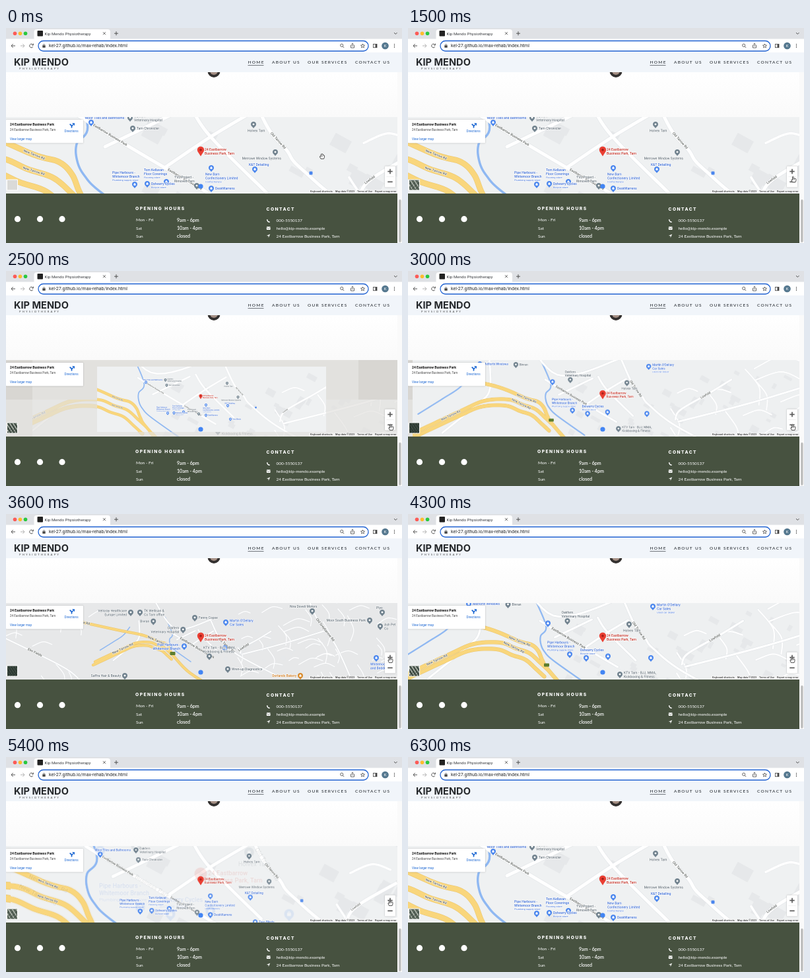
Write an HTML page with a canvas that moves like this. It is 600 by 326 pixels and loops after 6400 ms.

```html
<!DOCTYPE html>
<html lang="en">
<head>
<meta charset="utf-8">
<title>Kip Mendo Physiotherapy</title>
<style>
html, body { margin: 0; width: 100%; height: 100%; overflow: hidden; background: #fff; }
canvas { display: block; width: 600px; height: 326px; }
</style>
</head>
<body>
<canvas id="stage"></canvas>
<script>
const LOOP = 6400, STEP = 100, CX = 295, CY = 194, MAP_TOP = 135, MAP_END = 251, PAGE_W = 593;
const SHOP = '#3f6fd6', CIVIC = '#68747d', FOOD = '#d07a1c';
const PIN = { [SHOP]: '#4a86ee', [CIVIC]: '#72838f', [FOOD]: '#d98a2b' };
const stage = document.getElementById('stage');
const dpr = Math.max(1, window.devicePixelRatio || 1);
stage.width = 600 * dpr;
stage.height = 326 * dpr;
const screen2d = stage.getContext('2d');
let g = screen2d;

const clamp = v => Math.min(1, Math.max(0, v));
const ease = v => v < .5 ? 2 * v * v : 1 - 2 * (1 - v) ** 2;
const mix = (a, b, p) => a + (b - a) * p;
const seeded = seed => () => (seed = seed * 16807 % 2147483647) / 2147483647;

function rect(x, y, w, h, color, r = 0) {
  g.fillStyle = color;
  g.beginPath();
  g.roundRect(x, y, w, h, r);
  g.fill();
}
function panel(x, y, w, h) {
  g.shadowColor = 'rgba(0,0,0,.3)';
  g.shadowBlur = 2 * dpr;
  rect(x, y, w, h, '#fff', 1);
  g.shadowBlur = 0;
  g.shadowColor = 'transparent';
}
function disc(x, y, r, color) {
  g.fillStyle = color;
  g.beginPath();
  g.arc(x, y, r, 0, 7);
  g.fill();
}
function arc(x, y, r, from, to, color, width) {
  g.strokeStyle = color;
  g.lineWidth = width;
  g.beginPath();
  g.arc(x, y, r, from, to);
  g.stroke();
}
function path(pts) {
  g.beginPath();
  for (let i = 0; i < pts.length; i += 2) g.lineTo(pts[i], pts[i + 1]);
}
function line(pts, color, width = 1) {
  g.strokeStyle = color;
  g.lineWidth = width;
  path(pts);
  g.stroke();
}
function shape(pts, color) {
  g.fillStyle = color;
  path(pts);
  g.fill();
}
function text(s, x, y, size, color, { weight = 400, family = 'Roboto', gap = 0, halo = false, angle = 0, align = 'left' } = {}) {
  g.save();
  g.translate(x, y);
  g.rotate(angle);
  g.font = `${weight} ${size}px ${family}, sans-serif`;
  g.letterSpacing = gap + 'px';
  g.textAlign = align;
  if (halo) {
    g.strokeStyle = 'rgba(255,255,255,.85)';
    g.lineWidth = 1.3;
    g.strokeText(s, 0, 0);
  }
  g.fillStyle = color;
  g.fillText(s, 0, 0);
  g.restore();
}

// Map positions are offsets from the red marker at the closest zoom; each level halves them.
const way = (points, name) => ({ name, pts: curve(points.split(' ').map(p => p.split(',').map(Number))) });
function curve(keys) {
  const out = [], at = i => keys[Math.min(keys.length - 1, Math.max(0, i))];
  for (let i = 0; i < keys.length - 1; i++)
    for (let u = 0; u < 1; u += .1)
      out.push([0, 1].map(d => {
        const [a, b, c, e] = [at(i - 1)[d], at(i)[d], at(i + 1)[d], at(i + 2)[d]];
        return b + u / 2 * (c - a + u * (2 * a - 5 * b + 4 * c - e + u * (3 * (b - c) + e - a)));
      }));
  return out.concat([at(keys.length - 1)]);
}
const shifted = ({ pts }, dx, dy) => ({ pts: pts.map(([x, y]) => [x + dx, y + dy]) });

const mainRoad = way('-940,-168 -520,-76 -354,-42 -253,-2 -215,9 -195,28 -183,56 -165,85 -80,176 20,244', 'New Tarrow Rd');
const slipRoad = way('-640,120 -470,40 -390,6 -310,2 -262,20 -222,34 -190,62 -165,85', 'New Tarrow Rd');
const trunks = [mainRoad, slipRoad, shifted(slipRoad, -12, 20)];
const rivers = [
  way('-215,-150 -172,-50 -188,-18 -187,8 -176,30 -150,56 -60,120'),
  way('-610,50 -530,0 -470,-40 -430,-90')
];
const lanes = [
  way('60,-134 100,-46 130,-9 152,19 245,91 465,206', 'Old Tarrow Rd'),
  way('-190,-64 -105,-12 45,76', 'Eastbarrow Business Park'),
  way('640,-296 708,-136 820,24 932,272', 'Old Greybarrow Rd'),
  way('425,-64 350,-18 257,36 240,68', 'Lowfold'),
  way('-145,-14 -95,-38 -33,-68'),
  way('-55,18 15,-29 77,-66'),
  way('-15,-74 15,-29 100,56'),
  way('-530,112 -420,22 -374,-28 -374,-128'),
  way('-1180,-20 -820,160 -700,270', 'Elm Fields'),
  way('250,75 500,10 760,-70'),
  way('-280,-250 -150,-80 60,-134')
];
const rand = seeded(77);
const closes = Array.from({ length: 60 }, () => {
  const x = rand() < .3 ? mix(-1250, -650, rand()) : mix(220, 1250, rand()), y = mix(-250, 240, rand());
  const a = (rand() < .5 ? .9 : -.6) + rand() * .3, r = 35 + rand() * 60, b = a + .3;
  return { pts: curve([[x, y], [x + r * Math.cos(a), y + r * Math.sin(a)], [x + 1.7 * r * Math.cos(b), y + 1.7 * r * Math.sin(b)]]) };
});
const blocks = Array.from({ length: 40 }, () => ({
  x: mix(-120, 620, rand()), y: mix(-110, 110, rand()), w: 10 + rand() * 24, h: 8 + rand() * 14
}));

// Label side for each zoom level: R right, L left, A/a above, B below, E below and right-aligned, '.' pin only, '-' hidden.
const places = [
  [-107, -52, CIVIC, 'RAL', 'Oakfern|Veterinary Hospital'],
  [-103, -36, CIVIC, 'R--', 'Tarn Chronicler'],
  [-166, -45, SHOP, 'A.-', 'Moor Tiles and Bathrooms'],
  [80, -42, CIVIC, 'BB-', 'Holvex Tarn'],
  [113, 0, CIVIC, 'E--', 'Merrowe Window Systems'],
  [82, 26, SHOP, 'A--', 'K&T Detailing'],
  [-100, 49, SHOP, 'aaL', 'Pipe Harbours -|Whitemoor Branch', 'Plumbing supply store'],
  [-52, 45, SHOP, 'a--', 'Tom Kellavan|Floor Coverings', 'Flooring store'],
  [-81, 48, SHOP, 'R--', 'Delwarry Cycles', 'Bicycle store'],
  [-50, 60, SHOP, '-A-', 'Delwarry Cycles', 'Bicycle store'],
  [-6, 51, CIVIC, 'a--', 'TVL Project -|Rimovelt Tarn'],
  [16, 24, SHOP, 'B--', 'New Barn|Confectionery Limited', 'Confectionery'],
  [16, 55, SHOP, 'R.-', 'DeskWarrens'],
  [146, 60, SHOP, '-..', ''],
  [90, 67, SHOP, 'R--', 'Tavo Blinds'],
  [-406, -104, SHOP, '-R-', 'Melforth Windows'],
  [-287, -102, CIVIC, '-RL', 'Bivran'],
  [152, -96, SHOP, '-RR', "Martin O'Dellary|Car Sales", 'Used car dealer'],
  [52, 110, CIVIC, '-RA', 'KTV Tarn - BJJ, MMA,|Kickboxing & Fitness'],
  [-424, -156, CIVIC, '--L', 'Velloray Healthcare|Europe Limited'],
  [-368, -156, CIVIC, '--R', 'TK Wellisan &|Co Tarn office'],
  [-36, -124, CIVIC, '--R', 'Fenny Copse'],
  [1024, -108, CIVIC, '--L', 'Moor South Business Park'],
  [676, -164, CIVIC, '--a', 'Nira Doveli Motors'],
  [1100, -156, CIVIC, '--A', 'Plyo'],
  [1088, -72, CIVIC, '--R', 'Ash Pet|Co'],
  [164, 188, CIVIC, '--R', 'Wren-up Diagnostics'],
  [604, 228, FOOD, '--L', 'Dorlands Bakery'],
  [-460, 228, CIVIC, '--L', 'Saffra Hair & Beauty'],
  [1064, 120, SHOP, '--B', 'Whitemoor|and Bedding']
];

function strokeWays(list, k, color, width) {
  g.strokeStyle = color;
  g.lineWidth = width;
  for (const { pts } of list) {
    g.beginPath();
    for (const [x, y] of pts) g.lineTo(CX + x / k, CY + y / k);
    g.stroke();
  }
}
// Repeats a road's name at even distances along its visible part.
function nameRoad({ name, pts }, k) {
  let next = 45, walked = 0;
  for (let i = 1; i < pts.length; i++) {
    const [dx, dy] = [0, 1].map(d => (pts[i][d] - pts[i - 1][d]) / k);
    const x = CX + pts[i][0] / k, y = CY + pts[i][1] / k;
    if (x < 0 || x > PAGE_W || y < MAP_TOP || y > MAP_END) continue;
    walked += Math.hypot(dx, dy);
    if (walked < next) continue;
    next += 130;
    let angle = Math.atan2(dy, dx);
    if (Math.abs(angle) > Math.PI / 2) angle += Math.PI;
    text(name, x, y + 1.5, 5.1, '#5d625f', { weight: 500, halo: true, angle, align: 'center' });
  }
}
function drop(x, tip, r, height, color) {
  const y = tip - height;
  shape([x - r * .92, y + r * .4, x, tip, x + r * .92, y + r * .4], color);
  disc(x, y, r, color);
}
function place([dx, dy, color, sides, name, sub], level) {
  const side = sides[level], x = CX + dx / 2 ** level, tip = CY + dy / 2 ** level, y = tip - 6;
  if (side === '-') return;
  drop(x, tip, 4, 6, PIN[color]);
  if (color === CIVIC) disc(x, y, 1.4, '#fff');
  else {
    rect(x - 1.6, y - .8, 3.2, 2.6, '#fff', .4);
    arc(x, y - .8, .9, Math.PI, 0, '#fff', .6);
  }
  if (side === '.') return;
  const lines = name.split('|'), small = level < 2 && sub;
  const left = { R: 6, L: -6, A: -9, a: -34, B: -9, E: 9 }[side];
  const top = 'Aa'.includes(side) ? 1 - 6 * lines.length - (small ? 5 : 0) : 'BE'.includes(side) ? 11.5 : lines.length > 1 ? -.5 : 2;
  const align = 'LE'.includes(side) ? 'right' : 'left';
  lines.forEach((s, i) => text(s, x + left, y + top + 6 * i, 5, color, { weight: 500, halo: true, align }));
  if (small) text(sub, x + left, y + top + 6 * lines.length - 1, 4, color, { halo: true, align });
}
function marker() {
  drop(CX, CY + .5, 5.2, 9.7, '#ea3f33');
  disc(CX, CY - 9.2, 1.8, '#a51f1a');
  ['24 Eastbarrow', 'Business Park, Tarn'].forEach((s, i) =>
    text(s, 301, 186 + 6 * i, 5.1, '#c5352b', { weight: 500, halo: true }));
}

const AREA = { x: CX - 314, y: CY - 98, w: 694, h: 198, res: 2 };
function paintLevel(level) {
  const c = document.createElement('canvas'), k = 2 ** level, res = AREA.res * dpr;
  c.width = AREA.w * res;
  c.height = AREA.h * res;
  g = c.getContext('2d');
  g.scale(res, res);
  g.translate(-AREA.x, -AREA.y);
  g.lineCap = g.lineJoin = 'round';
  rect(AREA.x, AREA.y, AREA.w, AREA.h, ['#eff1f2', '#eef0f1', '#e7e8e9'][level]);
  for (const { x, y, w, h } of blocks) {
    g.save();
    g.translate(CX + x / k, CY + y / k);
    g.rotate(.5);
    rect(0, 0, w / k, h / k, '#e6e8ea');
    g.restore();
  }
  const lane = 5.2 / k ** .72, trunk = 8 / k ** .6;
  strokeWays(rivers, k, '#8fb8f2', 3.4 / k ** .6);
  strokeWays(closes, k, '#dfe2e6', lane * .7 + .6);
  strokeWays(closes, k, '#fff', lane * .7);
  strokeWays(lanes, k, '#dbdfe3', lane + .9);
  strokeWays(lanes, k, '#fff', lane);
  strokeWays(trunks, k, '#e6bd5c', trunk + .8);
  strokeWays(trunks, k, '#f9d67c', trunk);
  [...trunks, ...lanes].filter(w => w.name).forEach(w => nameRoad(w, k));
  if (level) rect(CX - 170 / k - 4, CY + 70 / k - 2.5, 8, 5, '#5c7d2e', 1);
  else rect(459.5, 217.5, 5, 5, PIN[SHOP], 1);
  places.forEach(p => place(p, level));
  marker();
  g = screen2d;
  return c;
}
const levels = [0, 1, 2].map(paintLevel);

function drawLevel(level, scale, alpha = 1) {
  g.globalAlpha = alpha;
  g.drawImage(levels[level], CX + (AREA.x - CX) * scale, CY + (AREA.y - CY) * scale, AREA.w * scale, AREA.h * scale);
  g.globalAlpha = 1;
}
function clipTo(x, y, w, h) {
  g.save();
  g.beginPath();
  g.rect(x, y, w, h);
  g.clip();
}

const zooms = [
  { start: 2100, from: 0, to: 1 }, { start: 2900, from: 1, to: 2 },
  { start: 3900, from: 2, to: 1 }, { start: 5100, from: 1, to: 0 }
];
function map(t) {
  const { start, from, to } = zooms.filter(z => t >= z.start).pop() || { start: -LOOP, from: 1, to: 0 };
  const p = ease(clamp((t - start) / 400));
  clipTo(0, MAP_TOP, PAGE_W, MAP_END - MAP_TOP);
  rect(0, MAP_TOP, PAGE_W, MAP_END - MAP_TOP, '#e2e1de');
  if (to > from) {
    for (const x of [0, 534]) rect(x, MAP_TOP, x ? 60 : 40, 60, '#d8d6d2');
    clipTo(40, 195, PAGE_W, 60);
    drawLevel(to, 2 ** (1 - p), .3 * p);
    g.restore();
    drawLevel(from, 2 ** -p);
    drawLevel(to, 2 ** (1 - p), clamp((t - start - 400) / 300));
  } else {
    if (p < 1) drawLevel(from, 2 ** p);
    drawLevel(to, 2 ** (p - 1), p);
  }
  disc(295, 240, 3.6, '#4285f4');
  thumbnail(to, t >= 300);
  infoCard();
  controls();
  g.restore();
}

function thumbnail(level, loaded) {
  rect(1, 229.5, 17, 17, '#fff', 1);
  rect(2, 230.5, 15, 15, loaded ? ['#59665b', '#465249', '#303c35'][level] : '#dadad8');
  if (!loaded) return;
  clipTo(2, 230.5, 15, 15);
  for (let i = -15; i < 32; i += 6 - level) {
    line([i, 230, i + 11, 247], level === 2 ? '#5a6a5d' : '#b4bab1', level === 2 ? .6 : 1.5);
    line([i, 247, i + 15, 233], '#27322c', .7);
  }
  g.restore();
}
function infoCard() {
  const link = '#1a66d2';
  panel(0, 139, 117, 35.5);
  text('24 Eastbarrow Business Park', 6, 148.3, 5.1, '#111', { weight: 700 });
  text('24 Eastbarrow Business Park, Tarn', 6, 156.3, 4.5, '#444');
  text('View larger map', 6, 169.5, 4.6, link);
  text('Directions', 88.5, 157.7, 4.7, link);
  line([99.5, 151.5, 99.5, 148.3, 96.7, 145.6], link, 1.7);
  line([99.5, 148.8, 101.8, 146.5], link, 1.5);
  shape([100, 144.2, 104, 144.2, 104, 148.2], link);
}
function controls() {
  rect(459, 245.5, 135, 6, 'rgba(245,245,245,.75)');
  [['Keyboard shortcuts', 461], ['Map data ©2023', 499], ['Terms of Use', 532], ['Report a map error', 559]]
    .forEach(([s, x]) => text(s, x, 249.3, 3.9, '#111'));
  panel(574, 209.5, 16, 32);
  line([576.5, 225.5, 587.5, 225.5], '#e6e6e6', .6);
  for (const y of [217.5, 233.3]) line([578.3, y, 585.7, y], '#555', 1.6);
  line([582, 213.8, 582, 221.2], '#555', 1.6);
}

function browser() {
  const ink = '#444';
  rect(0, 0, 600, 17, '#dfe1e5');
  ['#fc5b57', '#fdbc2e', '#29c840'].forEach((c, i) => disc(13.5 + 8 * i, 8.2, 2.8, c));
  rect(42.5, 2, 115.5, 18, '#fff', 4);
  rect(0, 16.5, 600, 20.5, '#fff');
  rect(47.5, 4, 8.5, 8.5, '#222', 1);
  text('Kip Mendo Physiotherapy', 58.5, 10.8, 6.2, '#3a3d41');
  for (const d of [-2, 2]) line([149 - d, 6.2, 149 + d, 10.2], ink, .8);
  line([164, 8.2, 170, 8.2], ink, .9);
  line([167, 5.2, 167, 11.2], ink, .9);
  line([588, 7, 590.3, 9.3, 592.6, 7], ink, .9);
  for (const [x, d, c] of [[11, 1, ink], [25, -1, '#aaa']]) {
    line([x - 3, 27, x + 3, 27], c, .9);
    line([x - d * .4, 24.2, x - d * 3, 27, x - d * .4, 29.8], c, .9);
  }
  arc(38.5, 27, 2.8, .5, 5.6, ink, .9);
  line([41.4, 23.6, 41.4, 26, 39, 26], ink, .9);

  g.beginPath();
  g.roundRect(49, 19.5, 500, 15.5, 7.7);
  g.strokeStyle = '#1c5fd0';
  g.lineWidth = 1.3;
  g.stroke();
  rect(55.3, 26.2, 4.4, 3.6, ink, .5);
  arc(57.5, 26, 1.4, Math.PI, 0, ink, .7);
  text('kel-27.github.io/max-rehab/index.html', 65, 29.4, 7, '#25282b');
  arc(508.7, 26.3, 2.1, 0, 7, ink, .8);
  line([510.3, 28, 512.2, 30], ink, .8);
  line([523.5, 26, 522.5, 26, 522.5, 30, 527.5, 30, 527.5, 26, 526.5, 26], ink, .8);
  line([525, 28, 525, 23.3], ink, .8);
  line([523.6, 24.7, 525, 23.3, 526.4, 24.7], ink, .8);
  const star = Array.from({ length: 11 }, (_, i) => {
    const a = (i / 5 - .5) * Math.PI, r = i % 2 ? 1.4 : 3.2;
    return [540.5 + r * Math.cos(a), 27.2 + r * Math.sin(a)];
  });
  line(star.flat(), ink, .8);
  g.strokeRect(556.5, 24.5, 5.5, 5.2);
  rect(559.6, 24.5, 2.4, 5.2, ink);
  disc(574.5, 27, 5.3, '#55788f');
  text('K', 574.5, 29.1, 5.8, '#fff', { align: 'center' });
  for (const d of [-2.3, 0, 2.3]) disc(588.5, 27 + d, .7, ink);
}

function header() {
  const fade = g.createLinearGradient(0, 67, 0, MAP_TOP);
  fade.addColorStop(0, '#fff');
  fade.addColorStop(1, '#fafafa');
  rect(0, 67, PAGE_W, 68, fade);
  disc(315, 65.3, 9.6, '#33302f');
  disc(315, 65, 6, '#a58f84');
  rect(0, 37, 600, 30, '#f1f5fa');
  text('KIP MENDO', 12, 56.5, 14.6, '#25282b', { weight: 700, family: 'Inter' });
  text('PHYSIOTHERAPY', 20, 62.8, 4.2, '#444', { family: 'Lato', gap: 2.2 });
  [['HOME', 366.5], ['ABOUT US', 403], ['OUR SERVICES', 457], ['CONTACT US', 529]]
    .forEach(([s, x]) => text(s, x, 54.2, 6.5, '#2b3036', { weight: 500, family: 'Lato', gap: 1.3 }));
  line([366.5, 56.6, 390.5, 56.6], '#34393f', .7);
}

function footer() {
  const white = '#fff', green = '#475240', lato = { family: 'Lato' };
  const title = { weight: 800, family: 'Inter', gap: 1.5 };
  rect(0, MAP_END, PAGE_W, 326 - MAP_END, green);
  for (const x of [17.5, 51.5, 85]) disc(x, 289.7, 4.6, white);
  text('OPENING HOURS', 196, 276, 6.7, white, title);
  text('CONTACT', 394.5, 277.4, 6.6, white, title);
  [['Mon - Fri', '9am - 6pm'], ['Sat', '10am - 4pm'], ['Sun', 'closed']].forEach(([day, hours], i) => {
    text(day, 197, 293.4 + 12.2 * i, 6.5, white, lato);
    text(hours, 259, 293.8 + 12.2 * i, 7.1, white, { ...lato, weight: 600 });
  });
  ['000-5550137', 'hello@kip-mendo.example', '24 Eastbarrow Business Park, Tarn']
    .forEach((s, i) => text(s, 409.5, 294.3 + 11.6 * i, 6.4, white, lato));
  arc(399.7, 290.3, 4, Math.PI / 2, Math.PI, white, 1.6);
  rect(394.8, 301.3, 5.8, 4.6, white, .7);
  line([394.9, 302.4, 397.7, 304.3, 400.5, 302.4], green, .6);
  shape([400.2, 312.4, 394.8, 315, 397.6, 315.2, 397.8, 318], white);
  rect(PAGE_W, 67, 7, 259, '#fafafa');
  rect(595, 260, 3.8, 65, '#c1c1c1', 1.9);
}

function hand(x, y, pointing) {
  const reach = pointing ? -4.8 : -3.2;
  g.save();
  g.translate(x, y);
  g.beginPath();
  g.moveTo(-2, 4.3);
  g.lineTo(-3.7, 1.2);
  g.quadraticCurveTo(-3.6, -.2, -2, 1);
  g.lineTo(-2, reach + 1);
  g.quadraticCurveTo(-1.2, reach - .5, -.4, reach + 1);
  g.lineTo(-.4, pointing ? -1.2 : -3);
  g.quadraticCurveTo(1.1, pointing ? -2 : -3.9, 1.9, -1.1);
  g.quadraticCurveTo(3.3, -1.6, 3.5, .1);
  g.quadraticCurveTo(3.7, 2.7, 2.5, 4.3);
  g.closePath();
  g.fillStyle = '#fff';
  g.fill();
  g.strokeStyle = '#222';
  g.lineWidth = .8;
  g.stroke();
  for (const d of [-.5, .9]) line([d, -1, d, .9], '#222', .5);
  g.restore();
}
const moves = [
  { start: 900, end: 1500, x: 584.5, y: 229.5 },
  { start: 1500, end: 2000, x: 583.5, y: 237 },
  { start: 3200, end: 3500, x: 582.5, y: 221 }
];
function cursor(t) {
  if (t >= 5900) return;
  let x = 479, y = 194;
  for (const m of moves) {
    const p = ease(clamp((t - m.start) / (m.end - m.start)));
    x = mix(x, m.x, p);
    y = mix(y, m.y, p);
  }
  hand(x, y, t >= 1500);
}

function frame(now) {
  const t = Math.floor(now % LOOP / STEP) * STEP;
  g.setTransform(dpr, 0, 0, dpr, 0, 0);
  g.imageSmoothingQuality = 'high';
  rect(0, 0, 600, 326, '#fff');
  header();
  browser();
  map(t);
  footer();
  cursor(t);
}
const begin = performance.now();
function tick() {
  frame(performance.now() - begin);
  requestAnimationFrame(tick);
}
tick();
</script>
</body>
</html>
```
